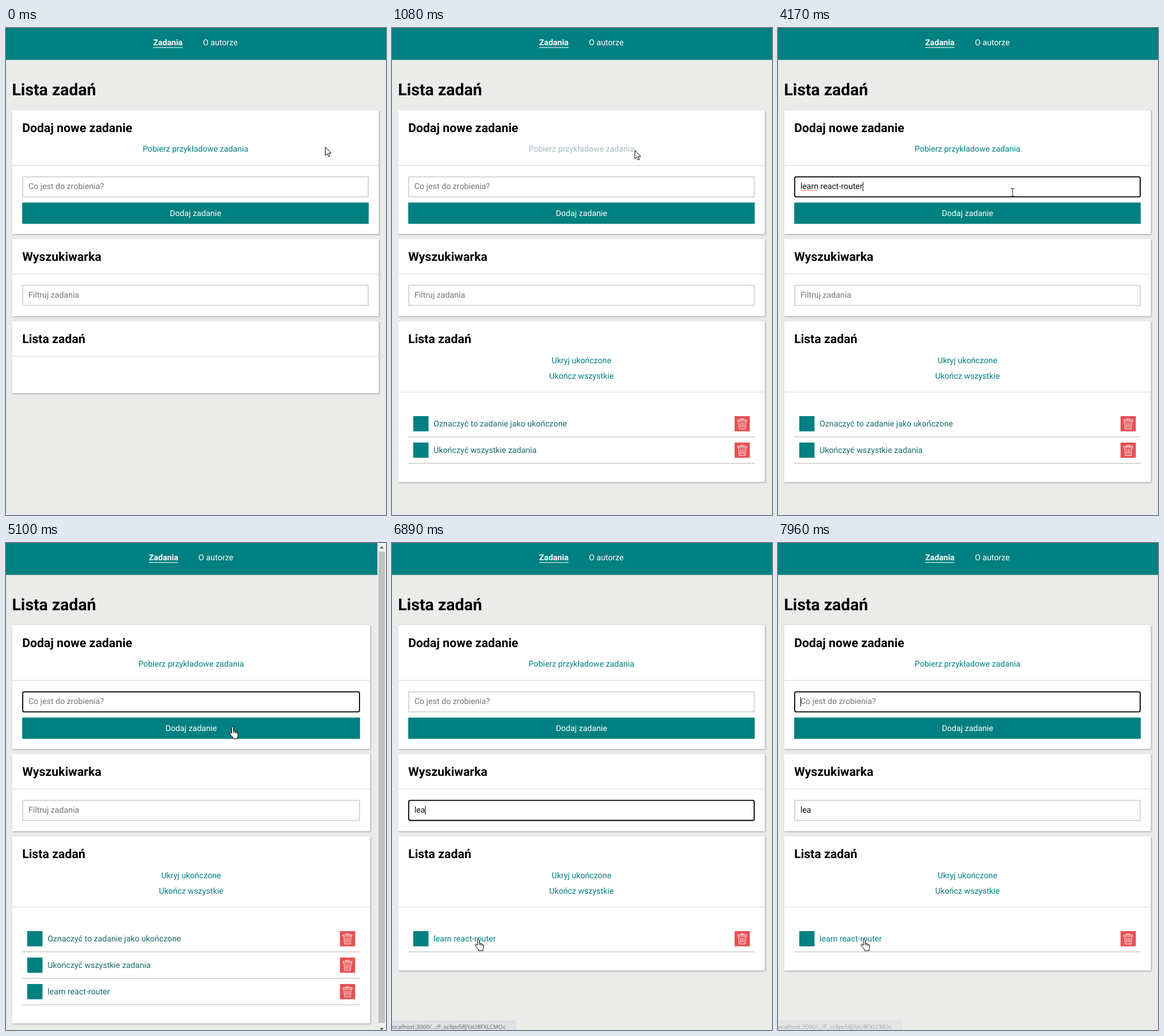
These frames come from a looping animation (661x847 px, 8 s). An HTML page:

```html
<!DOCTYPE html>
<html lang="pl">
<head>
<meta charset="utf-8">
<title>Lista zadań</title>
<style>
  html, body { margin: 0; width: 100%; height: 100%; overflow: hidden; background: #ebebea; }
  svg { display: block; }
  text { font: 14.2px Roboto, sans-serif; text-rendering: geometricPrecision; white-space: pre; }
  .bold { font-weight: bold; }
  .h1 { font-size: 28.4px; font-weight: bold; }
  .h2 { font-size: 21.3px; font-weight: bold; }
  .mid { text-anchor: middle; }
  .card { fill: #fff; filter: drop-shadow(1.4px 1.6px 1.6px #0005); }
  .status { font: 10px "Open Sans", sans-serif; }
</style>
</head>
<body>
<svg id="stage" width="661" height="847" viewBox="0 0 661 847"></svg>
<script>
const LOOP = 8000, TEAL = '#008080', LEFT = 28.2;
const stage = document.getElementById('stage');
const ruler = document.createElement('canvas').getContext('2d');
ruler.font = '142px Roboto, sans-serif';
const textWidth = s => ruler.measureText(s).width / 10;

const clamp = v => Math.max(0, Math.min(1, v));
const ramp = (t, a, b) => clamp((t - a) / (b - a));
const within = (v, a, b) => v >= a && v < b;

// Mouse journeys: start, end, then the points of a quadratic curve.
const journeys = [
  [140, 800, [555.5, 207], [490, 177], [422.5, 212.8]],
  [1300, 1540, [422.5, 212.8], [419, 250], [408, 286]],
  [4980, 5400, [408, 286], [375, 370], [327.5, 454]],
  [6340, 6800, [327.5, 454], [235, 590], [150, 688.5]],
];
const addKeys = [2110, 2165, 2220, 2360, 2470, 2580, 2860, 2930, 3110, 3250,
  3390, 3570, 3710, 3790, 3870, 3950, 4030, 4170];
const filterKeys = [5780, 5850, 5920];
const newTask = 'learn react-router';
const typed = (t, keys) => newTask.slice(0, keys.filter(k => k <= t).length);

const rect = (x, y, w, h, fill, extra = '') =>
  `<rect x="${x}" y="${y}" width="${w}" height="${h}" fill="${fill}" ${extra}/>`;
const text = (x, y, s, fill = '#000', cls = '') =>
  `<text x="${x}" y="${y}" fill="${fill}" class="${cls}">${s}</text>`;

function mouseAt(t) {
  const journey = journeys.filter(j => j[0] <= t).pop() || journeys[0];
  const [start, end, a, b, c] = journey;
  let u = ramp(t, start, end);
  u = u * u * (3 - 2 * u);
  return a.map((v, i) => v * (1 - u) ** 2 + 2 * b[i] * u * (1 - u) + c[i] * u * u);
}

function pointerKind(t, x, y) {
  if (within(t, 6920, 7890)) return t < 7200 ? 'hand' : 'arrow';
  if (within(y, 258, 295) || within(y, 447, 484)) return 'beam';
  const onLink = t < 770 && x < 428;
  const onButton = within(y, 304, 341);
  const onTask = y > 680 && x < 181;
  return onLink || onButton || onTask ? 'hand' : 'arrow';
}

function pointer(t) {
  const [x, y] = mouseAt(t);
  const shapes = {
    arrow: '<path d="M0 0V14.6L3.4 11.5L5.7 16.8L8 15.8L5.7 10.7H10.2Z" fill="#fff" stroke="#000"/>',
    hand: `<path d="M-1.6 11.5V1.6a1.6 1.6 0 0 1 3.2 0V7.5l1-.4q1.6 0 1.8 1.4q2-.5 2.6 1.1q2.3-.2 2.3 2v3.5
      q0 1.5-1 3v2.4h-8v-2.2q-3.2-3.2-5.4-7q-.6-1.6.8-2q1.1 0 2.7 2.2zM1.6 7.5v3.5M4.4 8.5v3M7 9.6v2.4"
      fill="#fff" stroke="#000"/>`,
    beam: '<path d="M-3.3-6.8H-1L0-6L1-6.8H3.3M0-6V6M-3.3 6.8H-1L0 6L1 6.8H3.3" fill="none" stroke="#222"/>',
  };
  return `<g transform="translate(${x.toFixed(2)} ${y.toFixed(2)})">${shapes[pointerKind(t, x, y)]}</g>`;
}

function card(top, bottom, divider, title, right) {
  return rect(10.5, top, right - 10.5, bottom - top, '#fff', 'class="card"')
    + rect(10.5, divider - .9, right - 10.5, 1.8, '#e8e8e8')
    + text(LEFT, top + 37.8, title, '#000', 'h2');
}

function field(top, right, value, placeholder, focused, caretOn) {
  const frame = focused ? 'stroke="#000" rx="2.5"' : 'stroke="#d3d3d3"';
  const caretX = 38.9 + textWidth(value);
  return rect(LEFT + .9, top + .9, right - LEFT - 1.8, 34.8, '#fff', frame + ' stroke-width="1.8"')
    + text(38.9, top + 22.4, value || placeholder, value ? '#111' : '#757575')
    + (focused && caretOn ? rect(caretX, top + 10, 1, 16, '#000') : '');
}

function squiggle(x, y, width) {
  let d = `M${x} ${y}`;
  for (let i = 1; i * 1.8 < width; i++) d += `l1.8 ${i % 2 ? -1.6 : 1.6}`;
  return `<path d="${d}" fill="none" stroke="#e33" stroke-width=".9"/>`;
}

function taskRow(i, label, right, color) {
  const top = 675 + 46 * i;
  return rect(37, top, 26.5, 26.5, TEAL)
    + text(72.3, top + 17.8, label, color)
    + rect(right - 35, top, 26.5, 26.5, '#e65154')
    + `<path transform="translate(${right - 35} ${top})" fill="none" stroke="#fbd5d5" stroke-width="1.2"
       d="M10.3 6.6V4.9H16.2V6.6M5.6 6.7H20.9V9H5.6ZM7.2 9L8 22.3H18.5L19.3 9M10.5 11.5V20M13.3 11.5V20M16.1 11.5V20"/>`
    + rect(LEFT, top + 35.2, right - LEFT, 1.8, '#d3d3d3');
}

function header(middle) {
  return rect(0, 0, 661, 55.5, TEAL)
    + text(middle - 73.6, 30, 'Zadania', '#fff', 'bold')
    + rect(middle - 73.5, 33.4, 51, 1.1, '#fff')
    + text(middle + 12.8, 30, 'O autorze', '#fff');
}

function scrollbar() {
  return rect(646, 0, 15, 847, '#f1f1f1') + rect(647.8, 15, 11.4, 820, '#c1c1c1')
    + '<path d="M650 9.5L653.5 6L657 9.5ZM650 843.5L653.5 847L657 843.5Z" fill="#505050"/>';
}

function detailsPage() {
  return header(329.5)
    + text(10.5, 116.8, 'Szczegóły zadania', '#000', 'h1')
    + card(142.8, 256, 203, newTask, 648.5)
    + text(LEFT, 234, 'Ukończone:', '#000', 'bold')
    + text(106.3, 234, 'Nie', '#111');
}

function linkColor(t) {
  if (!within(t, 770, 1160)) return TEAL;
  const k = t < 1080 ? 0 : ramp(t, 1060, 1160);
  const mix = to => Math.round(204 + (to - 204) * k);
  return `rgb(${mix(0)},${mix(128)},${mix(128)})`;
}

function listPage(t) {
  const narrow = within(t, 4380, 5780);
  const shift = narrow ? 15.1 : 0;
  const edge = 648.5 - shift, right = 630.9 - shift, middle = 329.6 - shift / 2;

  const addFocus = within(t, 1680, 5400) || t >= 7890;
  const filterFocus = within(t, 5400, 6920);
  const caretOn = ![[1970, 2110], [4730, 5230], [5570, 5780], [6200, 6700]].some(([a, b]) => within(t, a, b));
  const draft = t < 4380 ? typed(t, addKeys) : '';

  let tasks = [];
  if (t >= 1080) tasks = ['Oznaczyć to zadanie jako ukończone', 'Ukończyć wszystkie zadania'];
  if (t >= 4380) tasks.push(newTask);
  if (t >= 5780) tasks = [newTask];
  const [mx, my] = mouseAt(t);
  const taskColor = my > 680 && mx < 181 ? TEAL : '#186b69';
  const bottom = tasks.length ? 697.5 + 46 * tasks.length : 635;

  return header(middle)
    + text(10.5, 116.8, 'Lista zadań', '#000', 'h1')
    + card(142.8, 358.2, 239, 'Dodaj nowe zadanie', edge)
    + text(middle, 215.4, 'Pobierz przykładowe zadania', linkColor(t), 'mid')
    + field(258, right, draft, 'Co jest do zrobienia?', addFocus, caretOn)
    + (draft.length > 5 ? squiggle(38.9, 283.2, textWidth('learn')) : '')
    + rect(LEFT, 303.6, right - LEFT, 37, TEAL)
    + text(middle, 326.5, 'Dodaj zadanie', '#fff', 'mid')
    + card(367, 501.2, 428, 'Wyszukiwarka', edge)
    + field(446.8, right, typed(t, filterKeys), 'Filtruj zadania', filterFocus, caretOn)
    + card(510, bottom, tasks.length ? 633.2 : 571, 'Lista zadań', edge)
    + (tasks.length ? text(middle, 583.2, 'Ukryj ukończone', TEAL, 'mid')
      + text(middle, 609.6, 'Ukończ wszystkie', TEAL, 'mid') : '')
    + tasks.map((label, i) => taskRow(i, label, right, taskColor)).join('')
    + (narrow ? scrollbar() : '');
}

function statusBar(t) {
  const opacity = t < 7500 ? ramp(t, 6760, 6900) - ramp(t, 7140, 7220) : ramp(t, 7920, 8000);
  if (opacity <= 0) return '';
  return `<g opacity="${opacity.toFixed(2)}">`
    + rect(-5, 831.5, 220.5, 25, '#dee1e6', 'rx="3" stroke="#cfd2d6"')
    + text(-2.5, 845, 'localhost:3000/.../F_sc9pv58JYaU8FXLCMOc', '#5f6368', 'status') + '</g>';
}

let shown = '';
function draw() {
  const t = performance.now() % LOOP;
  const page = within(t, 6920, 7890) ? detailsPage() : listPage(t);
  const picture = page + statusBar(t) + pointer(t);
  if (picture !== shown) stage.innerHTML = shown = picture;
  requestAnimationFrame(draw);
}
draw();
</script>
</body>
</html>
```
